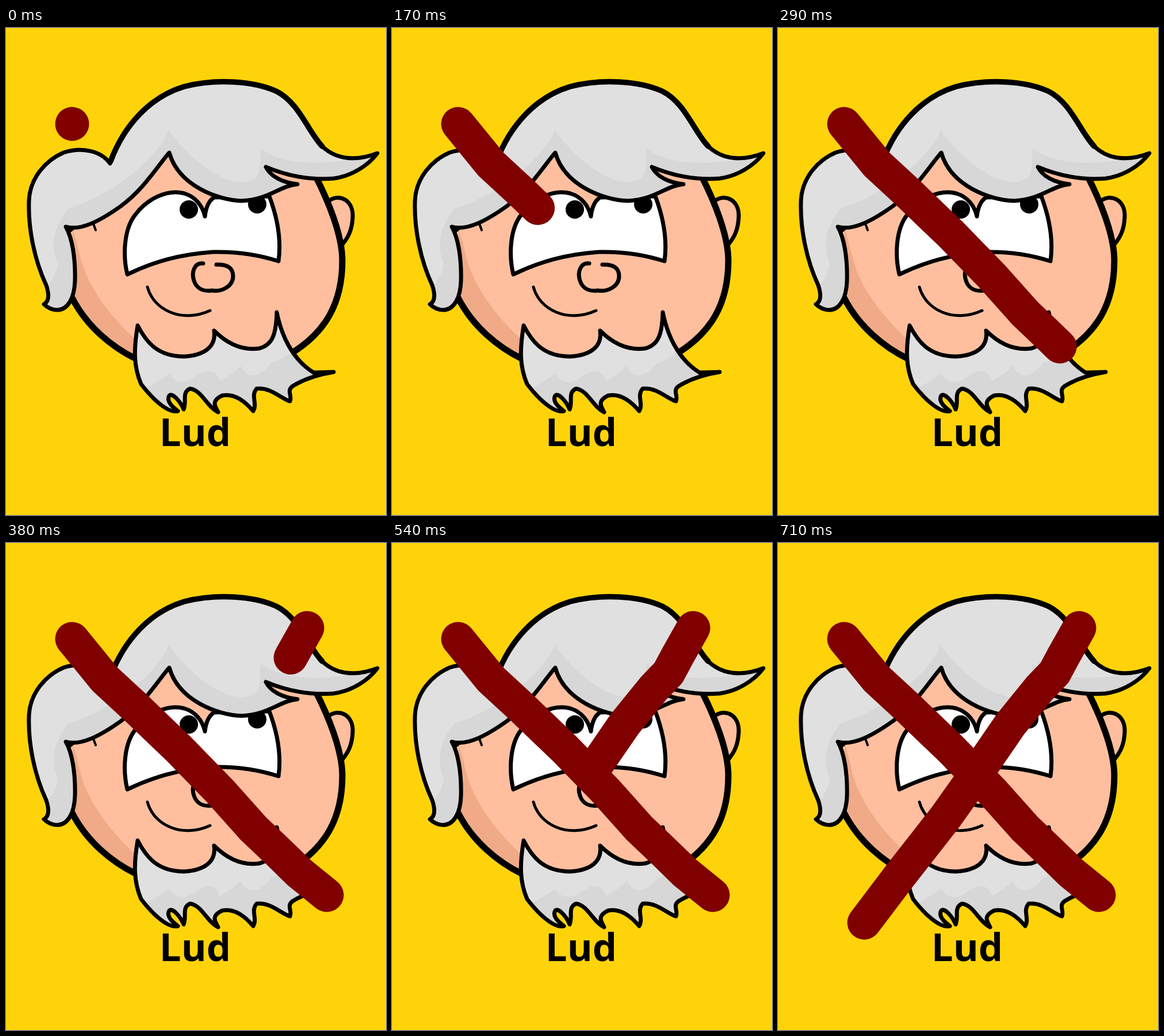
An HTML page that plays this animation: 661 px wide and 848 px high, repeating every 0.79 s.

```html
<!DOCTYPE html>
<html lang="en">
<head>
<meta charset="utf-8">
<title>Crossed out</title>
<style>
  html, body { margin: 0; width: 100%; height: 100%; overflow: hidden; background: #ffd30a; }
  svg { display: block; width: 100%; height: 100%; }
  .line { fill: none; stroke: #000; stroke-width: 7; stroke-linecap: round; stroke-linejoin: round; }
  .bold { stroke-width: 11; }
  .skin { fill: #ffbf9f; }
  .hair { fill: #e0e0e0; }
  .shade { fill: #d7d7d7; }
  .cross { fill: none; stroke: #800000; stroke-width: 59; stroke-linecap: round; stroke-linejoin: round; }
  text { font: 900 67px "Noto Sans", "Open Sans", sans-serif; text-anchor: middle; }
</style>
</head>
<body>
<svg viewBox="0 0 661 848">
  <defs>
    <path id="hair" d="M181 236C205 170 250 120 310 102C365 88 430 92 470 110C510 130 525 180 550 206C575 230 610 232 646 218C630 240 600 258 570 262C530 265 490 258 452 242C460 258 480 269 507 272C475 275 460 298 410 301C370 300 300 275 284 217C260 245 240 280 200 310C165 335 130 354 104 346C115 365 121 400 120 440C119 470 108 490 90 491C80 491 72 487 66 481C77 475 74 460 70 448C50 405 38 350 40 300C42 260 70 230 100 217C130 207 165 213 181 236Z"/>
    <path id="beard" d="M229 518C243 545 262 572 310 572C345 570 366 555 362 527C385 550 410 562 440 558C465 552 470 530 471 495C478 530 495 575 535 600L570 599C545 603 520 610 498 624C488 632 498 640 494 650C478 645 460 625 436 628C425 640 438 655 430 667C420 655 400 635 376 640C355 650 365 660 369 669C350 660 340 630 320 628C305 635 315 650 309 664C303 650 290 635 284 640C278 650 290 660 299 667C280 672 250 640 235 620C222 590 222 560 229 518Z"/>
    <clipPath id="inHair"><use href="#hair"/></clipPath>
    <clipPath id="inBeard"><use href="#beard"/></clipPath>
  </defs>

  <path class="skin" d="M563 300C580 288 605 300 603 330C602 352 595 365 585 377Z"/>
  <path class="line" d="M563 300C580 288 605 300 603 330C602 352 595 365 585 377"/>
  <path class="skin" d="M110 345L114 468C140 520 185 556 226 576L497 566C555 530 585 480 585 405C585 360 560 300 538 257L284 210Z"/>
  <path fill="#f0aa87" d="M116 350C126 380 130 410 140 430C160 475 195 515 228 545V577C185 556 140 520 114 468Z"/>
  <path class="line bold" d="M114 468C140 520 185 556 226 576M497 566C555 530 585 480 585 405C585 360 560 300 538 257"/>

  <path class="line" style="fill:#fff" d="M211 429C203 395 205 350 225 325C245 298 280 280 310 288C330 294 342 310 346 328C348 310 354 300 362 295L458 293C472 330 479 370 474 406C440 395 400 389 360 390C300 394 255 408 211 429Z"/>
  <circle cx="318" cy="316" r="16"/>
  <circle cx="437" cy="307" r="16"/>
  <path class="line" stroke-width="6" d="M343 410C328 408 322 425 327 440C332 455 345 459 358 457C375 460 395 450 395 432C395 418 385 411 366 412"/>
  <path class="line" style="stroke-width:5" d="M246 451C256 490 305 515 355 492"/>

  <use href="#hair" class="hair"/>
  <path class="shade" clip-path="url(#inHair)" d="M283 178C270 215 200 285 108 315C85 345 75 375 90 410C88 430 75 445 72 452L66 500L130 490L110 350L290 310L450 330L650 260L646 218C580 238 490 245 443 210C440 240 450 265 410 269C360 265 310 215 283 178Z"/>
  <use href="#hair" class="line"/>
  <path class="line" style="stroke-width:9.5" d="M182 232C205 170 250 120 310 102C365 88 430 92 470 110C510 130 525 180 550 206"/>
  <path d="M103 344L122 348L110 358Z"/>
  <path class="line" style="stroke-width:4" d="M152 341L156 352"/>

  <use href="#beard" class="hair"/>
  <path class="shade" clip-path="url(#inBeard)" d="M230 630C255 625 270 610 285 602C292 618 312 622 330 607C352 592 366 595 372 615C390 604 400 598 408 588C420 612 440 610 462 583Q475 580 495 565L560 600L500 680H230Z"/>
  <use href="#beard" class="line"/>
  <text x="329" y="728">Lud</text>

  <path class="cross" d="M115 167L172 237L224 285L300 358L372 432L430 497L471 536L510 574L558 613"/>
  <path class="cross" d="M524 148L497 196L481 226L455 253L404 316L345 402L291 478L212 579L150 661"/>
</svg>
<script>
  const LOOP = 790, STEP = 1000 / 24, LAST = 17;
  const strokes = [...document.querySelectorAll(".cross")];
  // [step, drawn length] pairs for each stroke
  const progress = [
    [[0, 0], [2, 65], [4, 202], [6, 440], [8, 640]],
    [[8, 0], [9, 59], [13, 298], [15, 429], [17, 640]]
  ];

  function lengthAt(keys, step) {
    const next = keys.findIndex(([s]) => s > step);
    if (next < 0) return keys[keys.length - 1][1];
    const [s0, d0] = keys[next - 1], [s1, d1] = keys[next];
    return d0 + (d1 - d0) * (step - s0) / (s1 - s0);
  }

  function draw(now) {
    const step = Math.min(LAST, Math.floor((now % LOOP + 4) / STEP));
    strokes.forEach((stroke, i) => {
      const started = step >= progress[i][0][0];
      stroke.style.display = started ? "" : "none";
      if (started) stroke.style.strokeDasharray = `${lengthAt(progress[i], step) + 0.1} 2000`;
    });
    requestAnimationFrame(() => draw(performance.now() - start));
  }

  const start = performance.now();
  draw(0);
</script>
</body>
</html>
```
